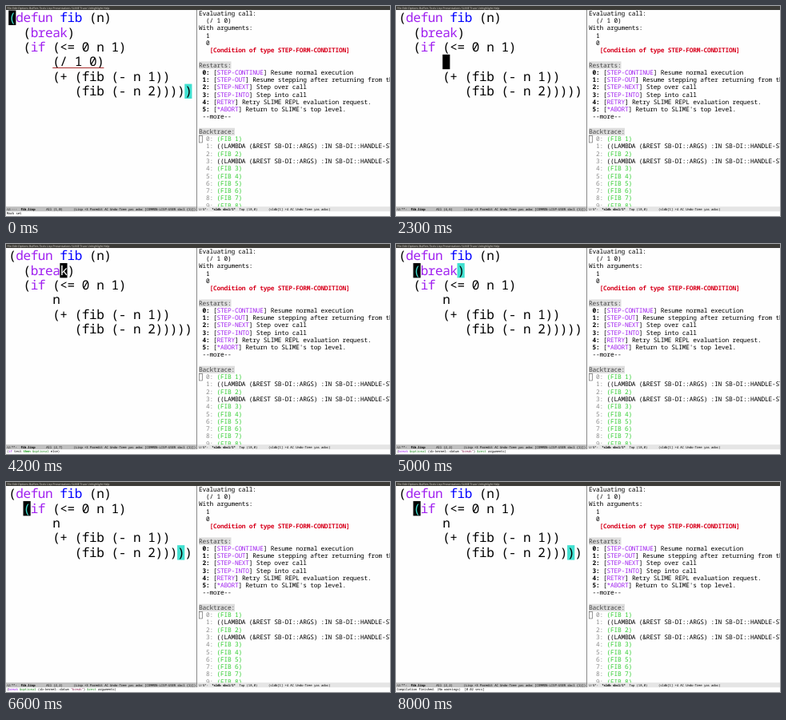
Write an HTML page that moves like this. It is 480 by 263 pixels and loops after 8.1 s.

```html
<!DOCTYPE html>
<html lang="en">
<head>
<meta charset="utf-8">
<title>Stepping through fib</title>
<style>
  html, body { margin: 0; width: 100%; height: 100%; overflow: hidden; background: #fefefe; }
  svg { display: block; width: 100vw; height: 100vh; }
  text { font-family: "Noto Sans Mono", "DejaVu Sans Mono", monospace; white-space: pre;
         letter-spacing: -0.03em; text-rendering: geometricPrecision; fill: #000; }
  .menu { font-family: "Open Sans", "Noto Sans", sans-serif; letter-spacing: 0; fill: #dfdbd2; }
  .keyword { fill: #a020f0; }
  .function { fill: #00f; }
  .error { fill: #d8001c; font-weight: 700; }
  .frame { fill: #32cd32; }
  .dim { fill: #8c8c8c; }
  .heading { fill: #444; }
  .bold { font-weight: 700; }
  .type { fill: #228b22; }
  .string { fill: #8b2252; }
  .argument { fill: #1c9a1c; font-weight: 700; }
  .inverse { fill: #fff; }
  .matched { fill: #40e0d0; }
</style>
</head>
<body>
<svg viewBox="0 0 480 263" preserveAspectRatio="none">
  <g id="fixed"></g>
  <g id="editor"></g>
</svg>
<script>
const LOOP = 8100;
const ADVANCE = 0.57; // cell width per unit of font size, letter spacing included
const CODE = { x: 3.2, y: 5.5, cell: 9.17, line: 18.42 };
const DEBUG = { x: 241, y: 4.6, cell: 4.5, line: 9.26 };
const SMALL = 2.28;

const escapeText = s => s.replace(/&/g, '&amp;').replace(/</g, '&lt;');
const rect = (x, y, w, h, fill, extra = '') =>
  `<rect x="${x}" y="${y}" width="${w}" height="${h}" fill="${fill}" ${extra}/>`;

// Runs are plain strings or [string, class] pairs.
function text(x, baseline, cell, ...runs) {
  const spans = runs.map(run => {
    const [content, style] = [].concat(run);
    return `<tspan class="${style || ''}">${escapeText(content)}</tspan>`;
  });
  return `<text x="${x}" y="${baseline}" font-size="${cell / ADVANCE}">${spans.join('')}</text>`;
}

function debuggerPane() {
  const restarts = [
    ['STEP-CONTINUE', 'Resume normal execution'],
    ['STEP-OUT', 'Resume stepping after returning from the'],
    ['STEP-NEXT', 'Step over call'],
    ['STEP-INTO', 'Step into call'],
    ['RETRY', 'Retry SLIME REPL evaluation request.'],
    ['*ABORT', "Return to SLIME's top level."],
  ];
  const lambda = '((LAMBDA (&REST SB-DI::ARGS) :IN SB-DI::HANDLE-STEP';
  const calls = ['(FIB 1)', lambda, '(FIB 2)', lambda,
    ...[3, 4, 5, 6, 7, 8].map(n => `(FIB ${n})`)];
  const rows = [
    ['Evaluating call:'], ['  (/ 1 0)'], ['With arguments:'], ['  1'], ['  0'],
    ['   ', ['[Condition of type STEP-FORM-CONDITION]', 'error']],
    [''], [['Restarts:', 'heading']],
    ...restarts.map(([name, help], i) => [[` ${i}:`, 'bold'], ' [', [name, 'keyword'], `] ${help}`]),
    [' --more--'], [''], [['Backtrace:', 'heading']],
    ...calls.map((call, i) => [[`  ${i}: `, 'dim'], [call, call === lambda ? '' : 'frame']]),
  ];
  const { x, y, cell, line } = DEBUG;
  const heading = (row, length) => rect(x, y + row * line, length * cell, line, '#dedede');
  return heading(7, 9) + heading(16, 10) +
    rows.map((runs, i) => text(x, y + i * line + 7.2, cell, ...runs)).join('') +
    rect(x + 0.3, y + 17 * line + 0.3, cell - 0.4, line - 0.6, 'none', 'stroke="#555" stroke-width=".6"');
}

function fixedParts() {
  return rect(0, 0, 480, 263, '#fefefe') + debuggerPane() +
    rect(0, 0, 480, 5, '#3c3b37') +
    '<text class="menu" x="1.5" y="3.8" font-size="3.5">File Edit Options Buffers Tools Lisp ' +
    'Presentations SLIME Trace Unhighlight Help</text>' +
    rect(238, 5, 1, 252, '#8a8a8a') +
    rect(0, 251.2, 238, 6, '#bfbfbf') + rect(239, 251.2, 241, 6, '#e5e5e5') +
    text(239, 255.6, SMALL, ' U:%*-  ', ['*sldb sbcl/1*', 'bold'],
      '  Top (18,0)      (sldb[1] +4 AC Undo-Tree yas adoc)');
}

const program = (breakLines, branch) => [
  '(defun fib (n)',
  ...breakLines,
  '  (if (<= 0 n 1)',
  '      ' + branch,
  '      (+ (fib (- n 1))',
  '         (fib (- n 2)))))',
];
const joined = program([], 'n');
const ifHint = ['(', ['if', 'keyword'], ' test ', ['then', 'argument'], ' ', ['&optional', 'type'], ' else)'];
const breakHint = ['(', ['break', 'keyword'], ' ', ['&optional', 'type'], ' (sb-kernel::datum ',
  ['"break"', 'string'], ') ', ['&rest', 'type'], ' arguments)'];

// Each step overrides what changed since the previous one.
const steps = [
  { at: 0, code: program(['  (break)'], '(/ 1 0)'), cursor: [0, 0], match: [5, 24],
    note: true, modified: false, echo: ['Mark set'] },
  { at: 700, cursor: [3, 7], match: null, echo: ['Mark saved where search started'] },
  { at: 1900, cursor: [3, 6], match: [3, 12] },
  { at: 2200, code: program(['  (break)'], ''), match: null, note: false, modified: true, echo: [''] },
  { at: 2500, code: program(['  (break)'], 'n'), cursor: [3, 7] },
  { at: 2800, echo: ifHint },
  { at: 3900, cursor: [2, 7] },
  { at: 4100, cursor: [1, 7] },
  { at: 4500, echo: breakHint },
  { at: 4900, cursor: [1, 2], match: [1, 8] },
  { at: 5400, code: program(['  '], 'n'), match: null },
  { at: 5800, code: joined },
  { at: 6000, match: [4, 23] },
  { at: 6700, echo: ['Compilation finished. (No warnings)  [0.02 secs]'] },
];
steps.forEach((step, i) => { steps[i] = { ...steps[i - 1], ...step }; });

function highlight(line) {
  return line.split(/(\bdefun\b|\bbreak\b|\bif\b)/).flatMap(part => {
    if (/^(defun|break|if)$/.test(part)) return [[part, 'keyword']];
    if (line.startsWith('(defun') && part.startsWith(' fib')) return [' ', ['fib', 'function'], part.slice(4)];
    return [part];
  });
}

function editorPane({ code, cursor, match, note, modified, echo }) {
  const { x, y, cell, line } = CODE;
  const left = col => x + col * cell;
  const top = row => y + row * line;
  const baseline = row => top(row) + 14.7;
  const block = ([row, col], fill) => rect(left(col), top(row), cell, line, fill);
  const [row, col] = cursor;
  const position = `(${row + 1},${col})`;
  return (match ? block(match, '#40e0d0') : '') +
    code.map((content, i) => text(x, baseline(i), cell, ...highlight(content))).join('') +
    (note ? rect(left(6), top(3) + 16.2, 7 * cell, 1, '#a52a2a') : '') +
    block(cursor, '#000') +
    text(left(col), baseline(row), cell, [code[row][col] || ' ', match ? 'matched' : 'inverse']) +
    text(0, 255.6, SMALL, `-U:${modified ? '**-' : '---'}  `, ['fib.lisp', 'bold'],
      `      All ${position}      (Lisp +3 Paredit AC Undo-Tree yas adoc [COMMON-LISP-USER sbcl {1}])`) +
    text(1, 261.4, SMALL, ...echo);
}

document.getElementById('fixed').innerHTML = fixedParts();
const editor = document.getElementById('editor');
let shown = null;

function render() {
  const time = performance.now() % LOOP;
  const step = steps.findLast(s => s.at <= time);
  if (step !== shown) {
    editor.innerHTML = editorPane(step);
    shown = step;
  }
  requestAnimationFrame(render);
}
render();
</script>
</body>
</html>
```
